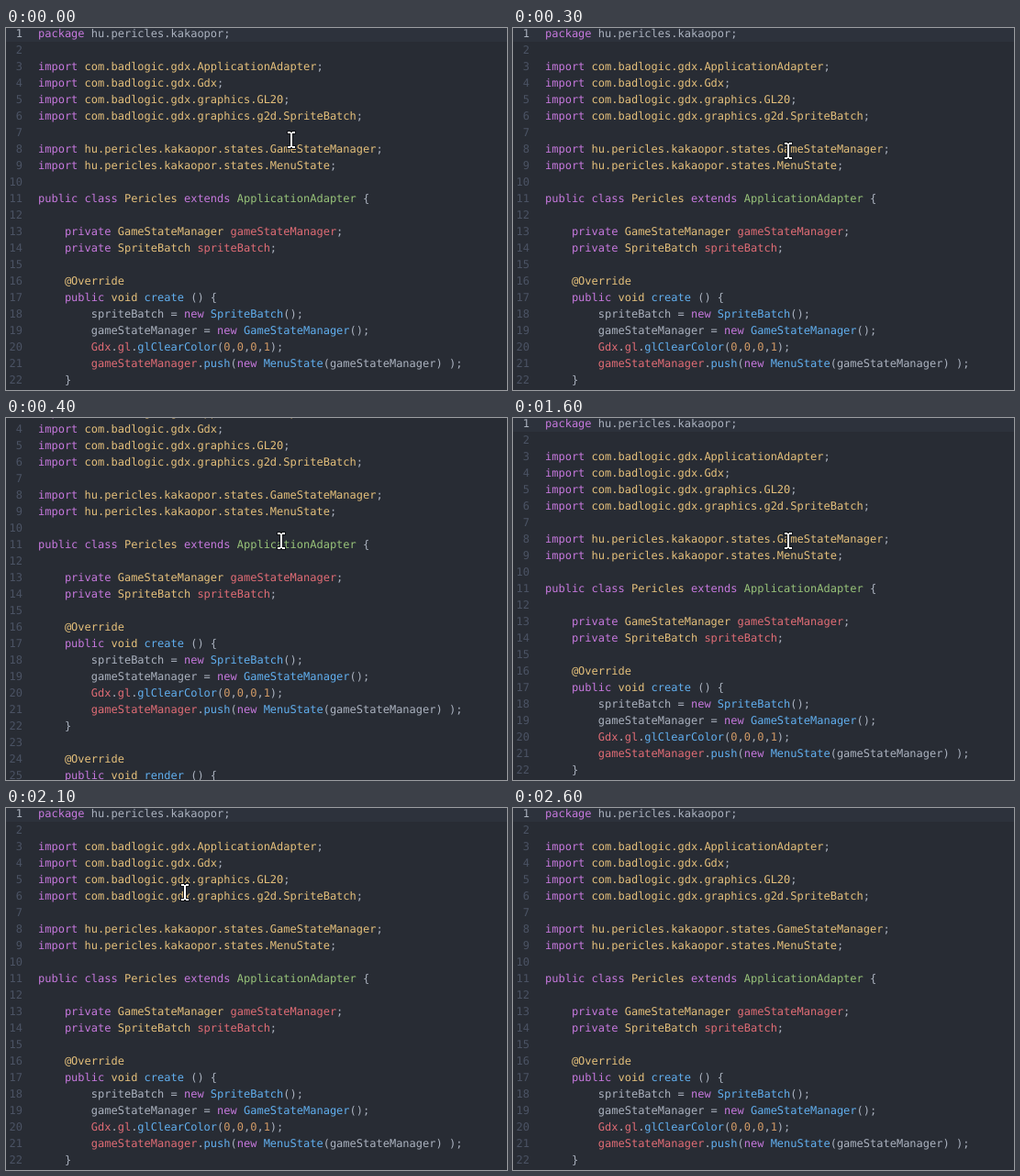
An HTML page with a canvas that plays this animation: 546x395 px, repeating every 2.9 s.

```html
<!DOCTYPE html>
<html lang="en">
<head>
<meta charset="utf-8">
<title>Editor scroll</title>
<style>
html, body { margin: 0; width: 100%; height: 100%; overflow: hidden; background: #282c34; }
canvas { display: block; }
</style>
</head>
<body>
<canvas id="stage" width="546" height="395"></canvas>
<script>
const ctx = document.getElementById('stage').getContext('2d');
const W = 546, H = 395, LOOP = 2900;
const ROW = 18, BASE = 10, LEFT = 35, GUTTER = 18;

const COLORS = {
  t: '#abb2bf', p: '#c678dd', y: '#e5c07b', r: '#e06c75',
  b: '#61afef', g: '#98c379', o: '#d19a66'
};

// Each piece of a line is "colour:text", pieces are split by "|".
const imp = name => `p:import |y:${name}|t:;`;
const field = (type, name) => `p:    private |y:${type} |r:${name}|t:;`;
const method = name => `p:    public |y:void |b:${name} |t:() {`;
const assign = (name, type) => `t:        ${name} = |p:new |b:${type}|t:();`;
const glCall = (name, args) => `r:        Gdx|t:.|r:gl|t:.|b:${name}|t:(|${args}|t:);`;

const code = [
  'p:package |t:hu.pericles.kakaopor;',
  '',
  imp('com.badlogic.gdx.ApplicationAdapter'),
  imp('com.badlogic.gdx.Gdx'),
  imp('com.badlogic.gdx.graphics.GL20'),
  imp('com.badlogic.gdx.graphics.g2d.SpriteBatch'),
  '',
  imp('hu.pericles.kakaopor.states.GameStateManager'),
  imp('hu.pericles.kakaopor.states.MenuState'),
  '',
  'p:public class |y:Pericles |p:extends |g:ApplicationAdapter |t:{',
  '',
  field('GameStateManager', 'gameStateManager'),
  field('SpriteBatch', 'spriteBatch'),
  '',
  'y:    @Override',
  method('create'),
  assign('spriteBatch', 'SpriteBatch'),
  assign('gameStateManager', 'GameStateManager'),
  glCall('glClearColor', 'o:0|t:,|o:0|t:,|o:0|t:,|o:1'),
  'r:        gameStateManager|t:.|b:push|t:(|p:new |b:MenuState|t:(gameStateManager) );',
  't:    }',
  '',
  'y:    @Override',
  method('render'),
  glCall('glClearColor', 'o:64|t:/|o:255f|t:, |o:128|t:/|o:255f|t:, |o:35|t:/|o:255f|t:, |o:1'),
  glCall('glClear', 'r:GL20|t:.|r:GL_COLOR_BUFFER_BIT'),
  ''
].map(line => line ? line.split('|').map(s => [COLORS[s[0]], s.slice(2)]) : []);

// [start ms, value...], held until the next entry
const scrolls = [[0, 0], [400, 48], [500, 101], [1600, 0]];
const pointer = [
  [0, 311, 122], [200, 303, 131], [300, 300, 134],
  [2100, 195, 92], [2200, 124, 56], [2300, 88, 31],
  [2400, 74, 15], [2500, 73, 4], [2600, 73, -40]
];
const at = (keys, t) => keys.filter(k => k[0] <= t).pop();

ctx.font = '12px "DejaVu Sans Mono", monospace';
ctx.textRendering = 'geometricPrecision';
const step = ctx.measureText('m'.repeat(100)).width / 100;

function drawLine(parts, i, y) {
  ctx.textAlign = 'right';
  ctx.fillStyle = i ? '#4b5364' : COLORS.t;
  ctx.fillText(i + 1, GUTTER, y);
  ctx.textAlign = 'left';
  let col = 0;
  for (const [color, text] of parts) {
    ctx.fillStyle = color;
    ctx.fillText(text, LEFT + col * step, y);
    col += text.length;
  }
}

function drawPointer(x, y) {
  const bars = [[-4, -9, 3, 2], [1, -9, 3, 2], [-1, -8, 2, 16], [-4, 7, 3, 2], [1, 7, 3, 2]];
  const paint = (color, pad) => {
    ctx.fillStyle = color;
    for (const [bx, by, w, h] of bars) {
      ctx.fillRect(x + bx - pad, y + by - pad, w + 2 * pad, h + 2 * pad);
    }
  };
  paint('#111318', 1);
  paint('#ffffff', 0);
}

function frame(now) {
  const t = now % LOOP;
  const scroll = at(scrolls, t)[1];
  ctx.fillStyle = '#282c34';
  ctx.fillRect(0, 0, W, H);
  ctx.fillStyle = '#2d323c';
  ctx.fillRect(0, BASE - 13 - scroll, W, ROW);
  code.forEach((parts, i) => drawLine(parts, i, BASE + i * ROW - scroll));
  const [, x, y] = at(pointer, t);
  drawPointer(x, y);
}

const start = performance.now();
function tick() {
  frame(performance.now() - start);
  requestAnimationFrame(tick);
}
tick();
</script>
</body>
</html>
```
